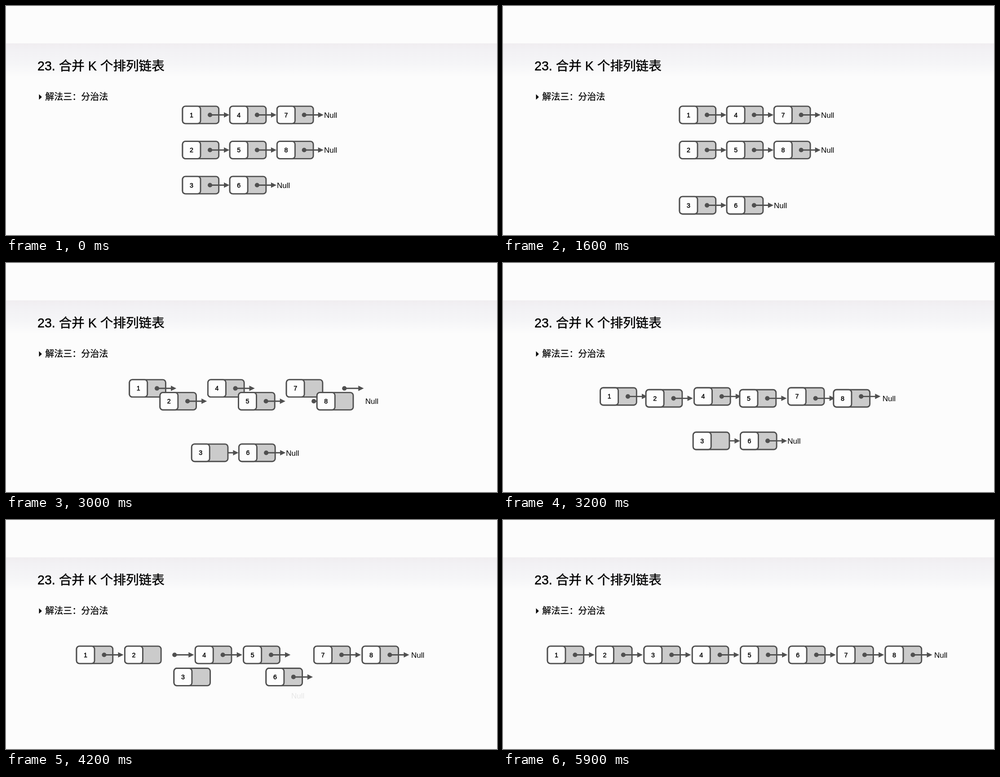
These frames come from a looping animation (1093 by 512 pixels, 6000 ms). An HTML page:

```html
<!DOCTYPE html>
<html lang="zh-CN">
<head>
<meta charset="utf-8">
<title>合并链表</title>
<style>
html, body { margin: 0; width: 100%; height: 100%; overflow: hidden; background: #fcfcfc; }
svg { display: block; width: 100%; height: 100%; }
text { font-family: "Liberation Sans", "Noto Sans CJK SC", "Noto Sans CJK", sans-serif; }
.medium { stroke: #000; stroke-width: .5; }
.cell { stroke: #505050; stroke-width: 2.9; }
</style>
</head>
<body>
<svg viewBox="0 0 1093 512">
  <defs>
    <linearGradient id="band" x1="0" y1="0" x2="0" y2="1">
      <stop offset="0" stop-color="#f0edf0"/>
      <stop offset=".2" stop-color="#f2f1f4"/>
      <stop offset=".6" stop-color="#f5f5f7"/>
      <stop offset="1" stop-color="#fcfcfc"/>
    </linearGradient>
  </defs>
  <rect width="1093" height="512" fill="#fcfcfc"/>
  <rect y="83.5" width="1093" height="75" fill="url(#band)"/>
  <text class="medium" x="70" y="144" font-size="28.6">23. 合并 K 个排列链表</text>
  <path d="M73.5 197.3L79.8 203.4L73.5 209.6Z"/>
  <text class="medium" x="87.3" y="210" font-size="20" style="stroke-width:.3">解法三：分治法</text>
  <g id="stage"></g>
</svg>
<script>
const LOOP = 6000, STEP = 100, MOVE = 759;
const STARTS = [1183, 2555, 3840];
const ROWS = [243.5, 322, 400.5];
const MERGED = 301.5, LOWERED = 478.5, WAITING = 393, NUDGE = 32;
const ARROW_ENDS = [[0, 3, 7], [2, 4, 6], [1, 5]];

const stage = document.getElementById("stage");
const slot = i => 99 + 107.43 * i;
const dotSlot = i => slot(i) + 61.4;

function group(markup) {
  const g = document.createElementNS("http://www.w3.org/2000/svg", "g");
  g.innerHTML = markup;
  return g;
}

const boxMarkup = n => `
  <rect class="cell" y="-19.4" width="80.7" height="38.8" rx="6.5" fill="#cbcbcb"/>
  <rect class="cell" y="-19.4" width="40" height="38.8" rx="6.5" fill="#fdfdfd"/>
  <text class="medium" x="20" y="5.1" font-size="14.3" text-anchor="middle">${n}</text>`;
const arrowMarkup = `
  <circle r="5.1" fill="#505050"/>
  <path d="M0 0H33" stroke="#505050" stroke-width="2.9"/>
  <path d="M31 -6L43.2 0L31 6Z" fill="#505050"/>`;
const nullMarkup = `<text y="6.2" font-size="17">Null</text>`;

// Four poses: separate lists, third list lowered, two lists merged, all merged.
function poses(row, x, mergedX, finalX) {
  const last = row === 2;
  return [
    [x, ROWS[row]],
    [x, last ? LOWERED : ROWS[row]],
    last ? [x + NUDGE, WAITING] : [mergedX, MERGED],
    [finalX, MERGED]
  ];
}

const boxes = [], arrows = [];
for (let n = 0; n < 8; n++) {
  const row = n % 3, col = Math.floor(n / 3);
  boxes.push({
    el: group(boxMarkup(n + 1)), order: 2 * n,
    poses: poses(row, 393 + 105.2 * col, slot(1 + 2 * col + row), slot(n))
  });
  // The two tail arrows trade places while their lists merge.
  const side = col === 2 ? 1 - row : row, end = ARROW_ENDS[row][col];
  arrows.push({
    el: group(arrowMarkup), order: 2 * end + 1,
    poses: poses(row, 454.1 + 104.8 * col, dotSlot(1 + 2 * col + side), dotSlot(end))
  });
}

const still = (x, y) => [x, y];
const nulls = [
  { fade: 1, poses: Array(4).fill(still(708, ROWS[0])) },
  { poses: poses(1, 708, 852.6, 960) },
  { fade: 2, poses: poses(2, 603, 0, 0) }
];
nulls[2].poses[3] = nulls[2].poses[2];
nulls.forEach(item => { item.el = group(nullMarkup); });

const parts = [...boxes, ...arrows, ...nulls];
const linkedOrder = [...nulls, ...[...boxes, ...arrows].sort((a, b) => a.order - b.order)];
const listOrder = [...nulls, ...boxes, ...arrows];
let currentOrder;

function setOrder(order) {
  if (order === currentOrder) return;
  currentOrder = order;
  stage.append(...order.map(item => item.el));
}

function ease(time, start) {
  const p = Math.min(1, Math.max(0, (time - start) / MOVE));
  return (1 - Math.cos(Math.PI * p)) / 2;
}

function draw(time) {
  const amounts = STARTS.map(start => ease(time, start));
  setOrder(amounts[1] > .5 ? linkedOrder : listOrder);
  for (const { el, poses, fade } of parts) {
    const [x, y] = [0, 1].map(axis => amounts.reduce(
      (sum, amount, i) => sum + amount * (poses[i + 1][axis] - poses[i][axis]),
      poses[0][axis]));
    el.setAttribute("transform", `translate(${x.toFixed(2)} ${y.toFixed(2)})`);
    if (fade) el.setAttribute("opacity", Math.max(0, 1 - 2 * amounts[fade]));
  }
}

const began = performance.now();
function tick() {
  const time = (performance.now() - began) % LOOP;
  draw(Math.floor(time / STEP) * STEP);
  requestAnimationFrame(tick);
}
tick();
</script>
</body>
</html>
```
